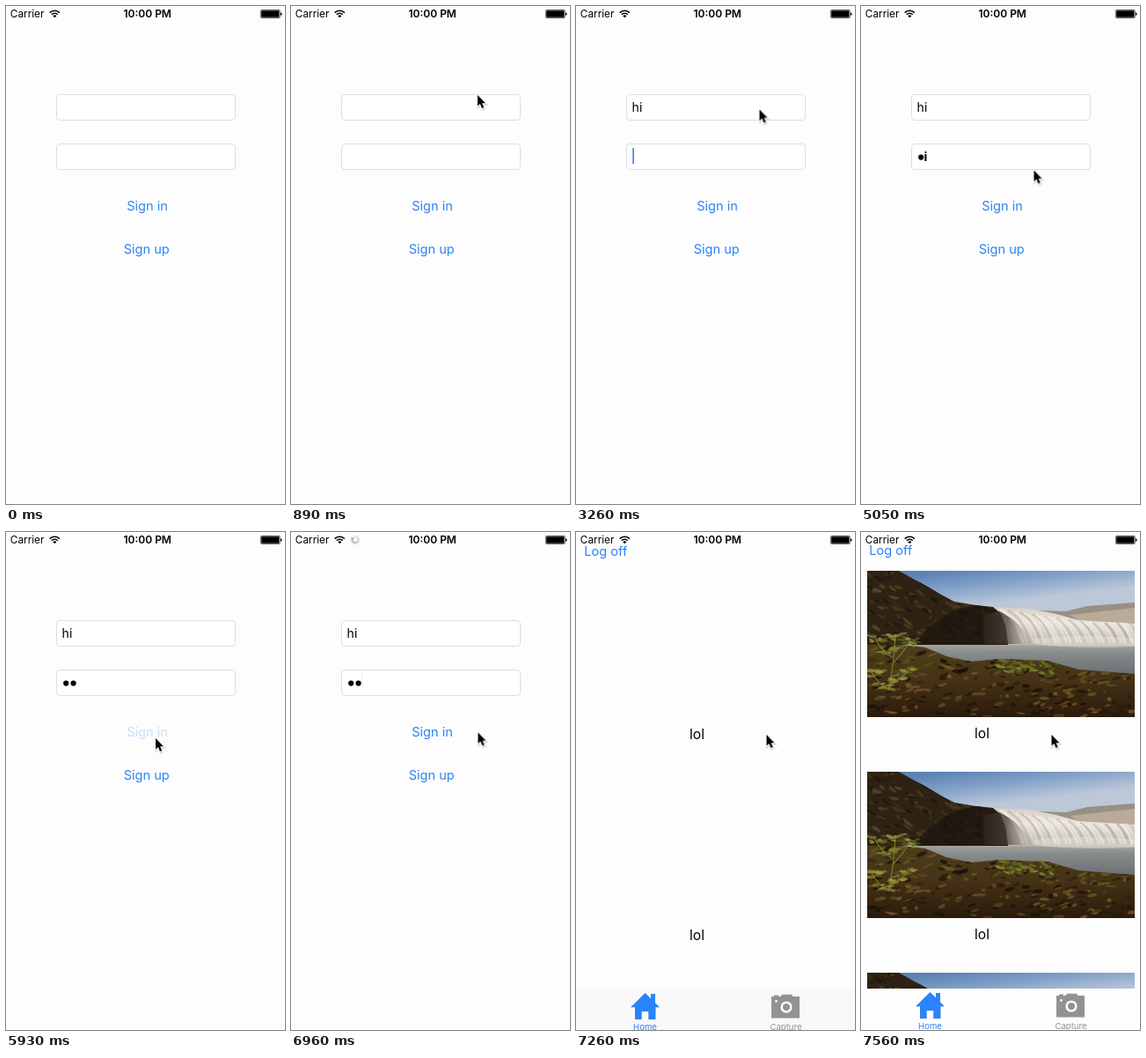
An HTML page that plays this animation: 317x565 px, repeating every 8000 ms.

```html
<!DOCTYPE html>
<html lang="en">
<head>
<meta charset="utf-8">
<title>Sign in</title>
<style>
  html, body { margin: 0; width: 100%; height: 100%; overflow: hidden; background: #fdfdfd; }
  svg { display: block; width: 317px; height: 565px; font-family: Inter, Roboto, sans-serif; }
  .timed { animation: 8s step-end infinite; }
  .blue { fill: #2a83f8; }
  .button { font-size: 14.6px; text-anchor: middle; }
  .typed { font-size: 14px; }
  .caption { font-size: 15.6px; text-anchor: middle; }
  .tab { font-size: 9.6px; text-anchor: middle; }
  .field { fill: #fff; stroke: #dedede; }
  .caret { fill: #4676f2; }

  #login { animation-name: login; }
  @keyframes login { 0% { opacity: 1 } 88.875% { opacity: 0 } }

  #home { animation-name: home; }
  @keyframes home {
    0% { opacity: 0; transform: translateY(9px) }
    88.875% { opacity: 1; transform: translateY(9px) }
    90.75% { opacity: 1; transform: translateY(1px) }
    92.625% { opacity: 1; transform: none }
  }
  #photos { animation-name: photos; }
  @keyframes photos { 0% { opacity: 1 } 90.75% { opacity: 0 } 94.5% { opacity: 1 } }
  #tint { animation-name: tint; }
  @keyframes tint { 0% { opacity: 0 } 90.75% { opacity: 1 } 94.5% { opacity: 0 } }

  #caret1 { animation-name: caret1; }
  @keyframes caret1 { 0% { opacity: 0 } 20.375% { opacity: 1 } 24.125% { opacity: .7 } 26% { opacity: 0 } }
  #caret2 { animation-name: caret2; }
  @keyframes caret2 {
    0% { opacity: 0 } 37.125% { opacity: .3 } 39% { opacity: .7 } 40.75% { opacity: 1 }
    48.25% { opacity: .5 } 50.125% { opacity: 0 }
  }
  #caret3 { animation-name: caret3; }
  @keyframes caret3 { 0% { opacity: 0 } 87% { opacity: .15 } 88.875% { opacity: 0 } }

  #nameH { animation-name: nameH; }
  @keyframes nameH { 0% { fill-opacity: 0 } 29.625% { fill-opacity: 1 } }
  #nameI { animation-name: nameI; }
  @keyframes nameI { 0% { fill-opacity: 0 } 31.5% { fill-opacity: 1 } }

  #passH { animation-name: passH; }
  @keyframes passH { 0% { opacity: 0 } 50.125% { opacity: 1 } 53.875% { opacity: 0 } }
  #dot1 { animation-name: dot1; }
  @keyframes dot1 { 0% { opacity: 0 } 53.875% { opacity: 1 } }
  #passI { animation-name: passI; }
  @keyframes passI { 0% { opacity: 0 } 53.875% { opacity: 1 } 74.125% { opacity: 0 } }
  #dot2 { animation-name: dot2; }
  @keyframes dot2 { 0% { opacity: 0 } 74.125% { opacity: 1 } }

  #signIn { animation-name: press; }
  @keyframes press { 0% { opacity: 1 } 74.125% { opacity: .25 } 76% { opacity: .6 } 77.875% { opacity: 1 } }

  #busy { animation-name: busy; }
  @keyframes busy { 0% { opacity: 0 } 76% { opacity: 1 } 88.875% { opacity: 0 } }
  #spin { animation: spin 1s steps(12) infinite; }
  @keyframes spin { to { transform: rotate(360deg) } }

  #pointer { animation-name: pointer; }
  @keyframes pointer {
    0% { opacity: 0; transform: translate(260px, 148px) }
    9.25% { opacity: 1; transform: translate(260px, 148px) }
    11.125% { opacity: 1; transform: translate(212px, 101px) }
    16.625% { opacity: 1; transform: translate(210px, 109px) }
    18.5% { opacity: 1; transform: translate(208.5px, 117.5px) }
    59.5% { opacity: 1; transform: translate(206px, 128px) }
    61.375% { opacity: 1; transform: translate(202px, 157px) }
    63.125% { opacity: 1; transform: translate(196.5px, 186.5px) }
    65% { opacity: 1; transform: translate(186px, 213px) }
    66.875% { opacity: 1; transform: translate(176px, 229px) }
    68.75% { opacity: 1; transform: translate(171px, 233px) }
    70.5% { opacity: 1; transform: translate(170px, 234px) }
    83.375% { opacity: 1; transform: translate(178px, 233px) }
    85.125% { opacity: 1; transform: translate(198px, 229px) }
    87% { opacity: 1; transform: translate(212.5px, 227.5px) }
    88.875% { opacity: 1; transform: translate(216.5px, 230px) }
  }
</style>
</head>
<body>
<svg viewBox="0 0 317 565">
  <defs>
    <linearGradient id="sky" x1=".3" y1="0" x2=".7" y2="1">
      <stop offset="0" stop-color="#5c82b4"/><stop offset=".2" stop-color="#84a2c9"/>
      <stop offset=".42" stop-color="#bcc8d8"/>
    </linearGradient>
    <linearGradient id="fall" x1="0" y1="0" x2="0" y2="1">
      <stop offset="0" stop-color="#d8cfc4"/><stop offset=".4" stop-color="#e9e3db"/>
      <stop offset="1" stop-color="#b9b2aa"/>
    </linearGradient>
    <linearGradient id="gorge" x1="0" y1="0" x2="1" y2="0">
      <stop offset="0" stop-color="#2b2119"/><stop offset=".5" stop-color="#4a4039" stop-opacity=".75"/>
      <stop offset="1" stop-color="#8a8078" stop-opacity="0"/>
    </linearGradient>
    <linearGradient id="lake" x1="0" y1="0" x2="0" y2="1">
      <stop offset="0" stop-color="#aeadab"/><stop offset=".3" stop-color="#898c8d"/>
      <stop offset="1" stop-color="#666a6c"/>
    </linearGradient>
    <linearGradient id="ground" x1="0" y1="0" x2="0" y2="1">
      <stop offset="0" stop-color="#4c4119"/><stop offset=".5" stop-color="#463216"/>
      <stop offset="1" stop-color="#2b1b0c"/>
    </linearGradient>
    <clipPath id="frame"><path d="M0 0H304V166H0Z"/></clipPath>
    <clipPath id="cliffClip"><path d="M0 0H36L52 9 69 18 84 27 99 35 123 39 143 41 152 49 157 62 160 84H0Z"/></clipPath>
    <clipPath id="groundClip"><path d="M0 84L40 84 66 87 90 97 118 103 150 100 205 102 240 112 304 117V166H0Z"/></clipPath>
    <g id="photo" clip-path="url(#frame)">
      <path fill="url(#sky)" d="M0 0H304V90H0Z"/>
      <path fill="#988f85" d="M195 45L226 46 250 40 304 36V70H195Z"/>
      <path fill="#b9aa9a" d="M230 50L304 42V62H250Z"/>
      <path fill="url(#lake)" d="M50 80H304V122H50Z"/>
      <path fill="url(#fall)" d="M140 41L185 43 215 49 240 56 304 60V85Q240 86 150 84Z"/>
      <g id="streaks" fill="none"/>
      <path fill="#f1ece6" opacity=".4" d="M190 77Q245 71 304 77V86Q235 89 190 83Z"/>
      <g clip-path="url(#cliffClip)">
        <path fill="#2e2214" d="M0 0H170V90H0Z"/>
        <g id="cliff"/>
        <path fill="#1c140e" opacity=".75" d="M70 64L100 44 126 38 150 46 166 84H50Z"/>
      </g>
      <path fill="url(#gorge)" d="M132 50L150 46Q176 58 186 83H132Z"/>
      <g clip-path="url(#groundClip)">
        <path fill="url(#ground)" d="M0 80H304V166H0Z"/>
        <g id="rocks"/>
        <g id="moss"/>
      </g>
      <path fill="none" stroke="#77772c" stroke-width="1.3" d="M24 136Q30 110 32 74M30 104Q42 92 48 80M28 98Q16 90 9 77M24 130Q40 122 48 112M24 134Q12 128 5 115"/>
      <g id="leaves"/>
    </g>
    <path id="arrow" d="M0 0V12.6L2.9 10 5 15 7.2 14 5.1 9.2H9Z"/>
  </defs>

  <rect width="317" height="565" fill="#fdfdfd"/>

  <g id="login" class="timed">
    <rect class="field" x="57.5" y="100.5" width="203" height="29" rx="3.5"/>
    <rect class="field" x="57.5" y="156.5" width="203" height="29" rx="3.5"/>
    <text class="typed" x="63.6" y="120"><tspan id="nameH" class="timed">h</tspan><tspan id="nameI" class="timed">i</tspan></text>
    <g class="typed" font-weight="700">
      <text id="passH" class="timed" x="63.6" y="176">h</text>
      <text id="passI" class="timed" x="71.6" y="176">i</text>
    </g>
    <circle id="dot1" class="timed" cx="68.2" cy="171.6" r="3.1"/>
    <circle id="dot2" class="timed" cx="76.6" cy="171.6" r="3.1"/>
    <rect id="caret1" class="caret timed" x="64.3" y="105" width="1.6" height="18"/>
    <rect id="caret2" class="caret timed" x="64.3" y="161" width="1.6" height="18"/>
    <rect id="caret3" class="caret timed" x="80.3" y="161" width="1.2" height="16"/>
    <text id="signIn" class="button blue timed" x="160.5" y="232">Sign in</text>
    <text class="button blue" x="159.7" y="281">Sign up</text>
  </g>

  <g id="home" class="timed">
    <g id="photos" class="timed">
      <use href="#photo" x="7" y="44"/>
      <use href="#photo" x="7" y="272"/>
      <use href="#photo" x="7" y="500"/>
    </g>
    <text class="button blue" x="33.8" y="26">Log off</text>
    <text class="caption" x="137.5" y="234">lol</text>
    <text class="caption" x="137.5" y="462">lol</text>
    <rect y="518" width="317" height="60" fill="#fdfdfd"/>
    <rect id="tint" class="timed" y="518" width="317" height="60" fill="#f9f9f9"/>
    <path class="blue" d="M78.5 522L85 528.3V523H90V533.2L95 538.3H90.5V552H82.3V543H74.7V552H67V538.3H62Z"/>
    <g fill="#929292">
      <path d="M225 524.6H230V526H232.5L234 523.7H245L246.5 526H254V550.5H222V526H225Z"/>
      <circle cx="239" cy="538" r="5.3" stroke="#fdfdfd" stroke-width="2.6"/>
      <circle cx="227.5" cy="531.3" r="1.4" fill="#fdfdfd"/>
      <text class="tab" x="238.5" y="563.5">Capture</text>
    </g>
    <text class="tab blue" x="78.5" y="563.5">Home</text>
  </g>

  <text x="4.8" y="13.2" font-size="11.8">Carrier</text>
  <text x="160.7" y="13.2" font-size="12" font-weight="600" text-anchor="middle">10:00 PM</text>
  <g fill="none" stroke="#000" stroke-width="1.6">
    <path d="M49.7 7.6A7.8 7.8 0 0 1 60.9 7.6M51.8 9.7A4.9 4.9 0 0 1 58.8 9.7"/>
    <path fill="#000" stroke="none" d="M55.3 13.3L53.2 11.2A3 3 0 0 1 57.4 11.2Z"/>
  </g>
  <rect x="289.4" y="4.5" width="21.8" height="9" rx="1" fill="none" stroke="#333" stroke-width=".8"/>
  <path d="M290.2 5.3H310.4V12.7H290.2ZM312 7.4Q313.6 7.6 313.6 9.1T312 10.8Z"/>
  <g transform="translate(73 8.8)"><g id="busy" class="timed"><g id="spin" stroke="#444" stroke-width=".8"></g></g></g>

  <g id="pointer" class="timed">
    <use href="#arrow" x=".6" y="1.3" fill="#000" stroke="#000" stroke-width="2.4" opacity=".14"/>
    <use href="#arrow" stroke="#fff" stroke-width="1.8" stroke-linejoin="round"/>
    <use href="#arrow"/>
  </g>
</svg>
<script>
  let seed = 7;
  const rand = (lo, hi) => {
    seed = (seed * 16807) % 2147483647;
    return lo + (hi - lo) * seed / 2147483647;
  };

  function add(parent, tag, attrs) {
    const el = document.createElementNS('http://www.w3.org/2000/svg', tag);
    for (const key in attrs) el.setAttribute(key, attrs[key]);
    document.getElementById(parent).append(el);
  }

  // Scatter tilted blobs inside a box
  function scatter(parent, count, [x0, y0, x1, y1], size, colors, tilt) {
    for (let i = 0; i < count; i++) {
      const x = rand(x0, x1), y = rand(y0, y1);
      add(parent, 'ellipse', {
        cx: x, cy: y, rx: rand(size / 2, size * 1.8), ry: rand(size / 4, size * .6),
        fill: colors[i % colors.length], opacity: rand(.4, .85),
        transform: `rotate(${rand(tilt - 20, tilt + 20)} ${x} ${y})`
      });
    }
  }

  scatter('cliff', 190, [0, 0, 140, 84], 3.6, ['#17100a', '#4f3d20', '#3d351a', '#5a4726', '#1c140c'], 28);
  scatter('rocks', 330, [0, 84, 304, 166], 3.8, ['#1c120a', '#745a28', '#5f5f1f', '#2a1c0e', '#7b5529', '#180f08'], -8);
  scatter('moss', 50, [146, 100, 216, 116], 3, ['#6f8426', '#56691c', '#86942f'], 5);
  for (const [x, y] of [[31, 74], [12, 77], [47, 81], [24, 90], [48, 112], [10, 116], [35, 122], [20, 132]])
    scatter('leaves', 10, [x - 11, y - 4, x + 11, y + 4], 3.4, ['#8a8c36', '#6d742a', '#a39f48'], 0);

  for (let i = 0; i < 34; i++) {
    const x = 146 + i * 4.6, y = 43 + Math.min(16, i * .7), lean = 18 - i * .3;
    add('streaks', 'path', {
      d: `M${x} ${y}Q${x + lean} ${y + 8} ${x + lean * 1.5} 82`,
      stroke: i % 3 ? '#f7f3ee' : '#a1988f', 'stroke-width': rand(1, 3.5), opacity: rand(.2, .55)
    });
  }

  for (let i = 0; i < 12; i++)
    add('spin', 'path', { d: 'M0 -2.3V-5', opacity: .25 + i * .06, transform: `rotate(${i * 30})` });
</script>
</body>
</html>
```
